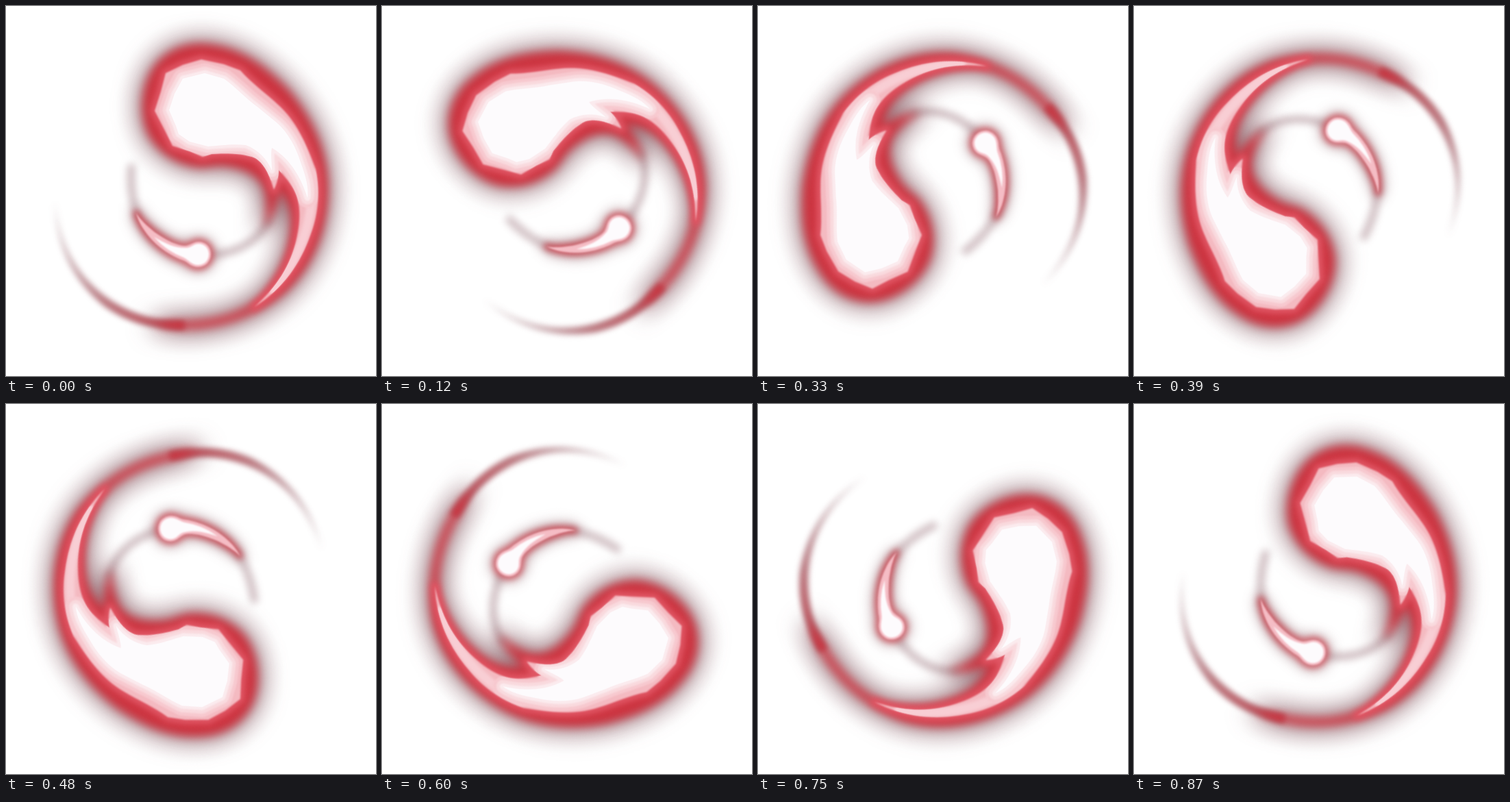
Write an HTML page with a canvas that moves like this. It is 540 px wide and 540 px high and loops after 0.9 s.

```html
<!DOCTYPE html>
<html lang="en">
<head>
<meta charset="utf-8">
<title>Swirl</title>
<style>
  html, body { margin: 0; width: 100%; height: 100%; overflow: hidden; background: #fff; }
  canvas {
    display: block; width: 540px; height: 540px;
    transform-origin: 270px 270px;
    will-change: transform;
    animation: spin 900ms steps(30, end) infinite;
  }
  @keyframes spin { to { transform: rotate(-360deg); } }
</style>
</head>
<body>
<canvas id="stage" width="540" height="540"></canvas>
<script>
const ctx = document.getElementById('stage').getContext('2d');
const RED = '#cd3440', DARK = '#66303a';

// Big drop: red body, pink flesh, white heart
const body = new Path2D(`M285 55C340 58 375 85 410 120C445 160 470 210 470 265C470 330 445 385 405 420
  C360 456 305 474 250 471C235 470 225 468 215 465C225 464 235 461 245 460C300 461 340 450 372 425
  C400 395 418 350 416 310C414 290 406 278 400 268C396 290 392 305 376 324C382 305 382 280 376 265
  C365 243 340 235 312 233L285 236C250 233 225 215 210 192C195 165 195 125 212 95C228 68 255 55 285 55Z`);
const flesh = new Path2D(`M285 78L318 85L342 94C358 112 380 128 396 143C424 168 438 200 452 238
  C460 275 454 310 444 335C430 375 405 412 363 439C395 410 415 380 424 340C431 310 430 285 419 266
  C412 254 404 246 398 239C398 250 395 260 391 268C386 252 380 232 364 222C345 214 315 215 300 216
  L287 220L268 212L243 204L232 182L217 153L226 125L233 98L258 86Z`);
const heart = new Path2D(`M290 98L318 106C335 118 350 135 368 148L396 171C412 185 424 208 430 228
  C438 250 442 265 440 280C432 255 418 225 388 207C386 215 388 228 388 240C380 222 368 210 350 203
  C330 201 310 204 295 205L268 198L252 187L248 175L238 152L246 128L258 106Z`);
const tail = new Path2D(`M71 285C76 345 100 394 150 429C185 452 215 461 260 461L260 471
  C215 470 180 462 145 438C98 400 74 350 71 285Z`);

// Small drop and the wisps on either side of it
const seed = new Path2D(`M281 344C292 344 299 352 299 362C299 373 291 381 280 381C270 381 266 374 258 371
  C236 363 212 346 197 320C194 314 191 308 190 302C196 312 205 320 217 330C235 343 251 350 262 350
  C269 349 274 344 281 344Z`);
const pip = new Path2D(`M281 347C290 347 296 354 296 362C296 371 290 378 280 378C271 378 267 371 259 367
  C244 361 229 352 216 337C234 348 250 354 264 353C271 352 274 347 281 347Z`);
const wisps = new Path2D('M384 312C370 340 343 358 305 363M193 308C185 285 181 265 183 235');

function paint(path, { fill, stroke, width = 0, blur = 0, alpha = 1 }) {
  ctx.save();
  ctx.filter = blur ? `blur(${blur}px)` : 'none';
  ctx.globalAlpha = alpha;
  ctx.lineJoin = ctx.lineCap = 'round';
  if (fill) {
    ctx.fillStyle = fill;
    ctx.fill(path);
  }
  if (stroke) {
    ctx.strokeStyle = stroke;
    ctx.lineWidth = width;
    ctx.stroke(path);
  }
  ctx.restore();
}

function fade(from, to) {
  const g = ctx.createLinearGradient(70, 0, 260, 0);
  g.addColorStop(0, from);
  g.addColorStop(1, to);
  return g;
}

// Halos
paint(body, { fill: DARK, stroke: DARK, width: 12, blur: 18, alpha: .66 });
paint(tail, { fill: fade('rgba(102,48,58,.5)', 'rgba(102,48,58,.7)'), blur: 5 });
paint(seed, { stroke: DARK, width: 12, blur: 10, alpha: .6 });
paint(wisps, { stroke: DARK, width: 10, blur: 6, alpha: .36 });

// Red
paint(body, { fill: RED, blur: 7 });
paint(tail, { fill: fade('rgba(205,52,64,0)', 'rgba(205,52,64,.9)'), blur: 4 });
paint(seed, { stroke: RED, width: 9, blur: 5, alpha: .75 });
paint(flesh, { stroke: '#e05664', width: 13, blur: 4 });

// Pink bands and white
paint(flesh, { fill: '#f4bac1', blur: 1 });
ctx.save();
ctx.clip(flesh);
paint(new Path2D('M446 245C450 310 432 365 390 414'), { stroke: '#f8ced4', width: 13, blur: 2 });
paint(heart, { stroke: '#f7c9cf', width: 29, blur: 1 });
paint(heart, { stroke: '#f9dade', width: 19, blur: 1 });
paint(heart, { stroke: '#fbebee', width: 9, blur: 1 });
paint(heart, { fill: '#fdfbfd', blur: .7 });
ctx.restore();
paint(seed, { fill: '#f5bdc5', blur: 1 });
paint(pip, { fill: '#fdfbfd', blur: 1 });
</script>
</body>
</html>
```
